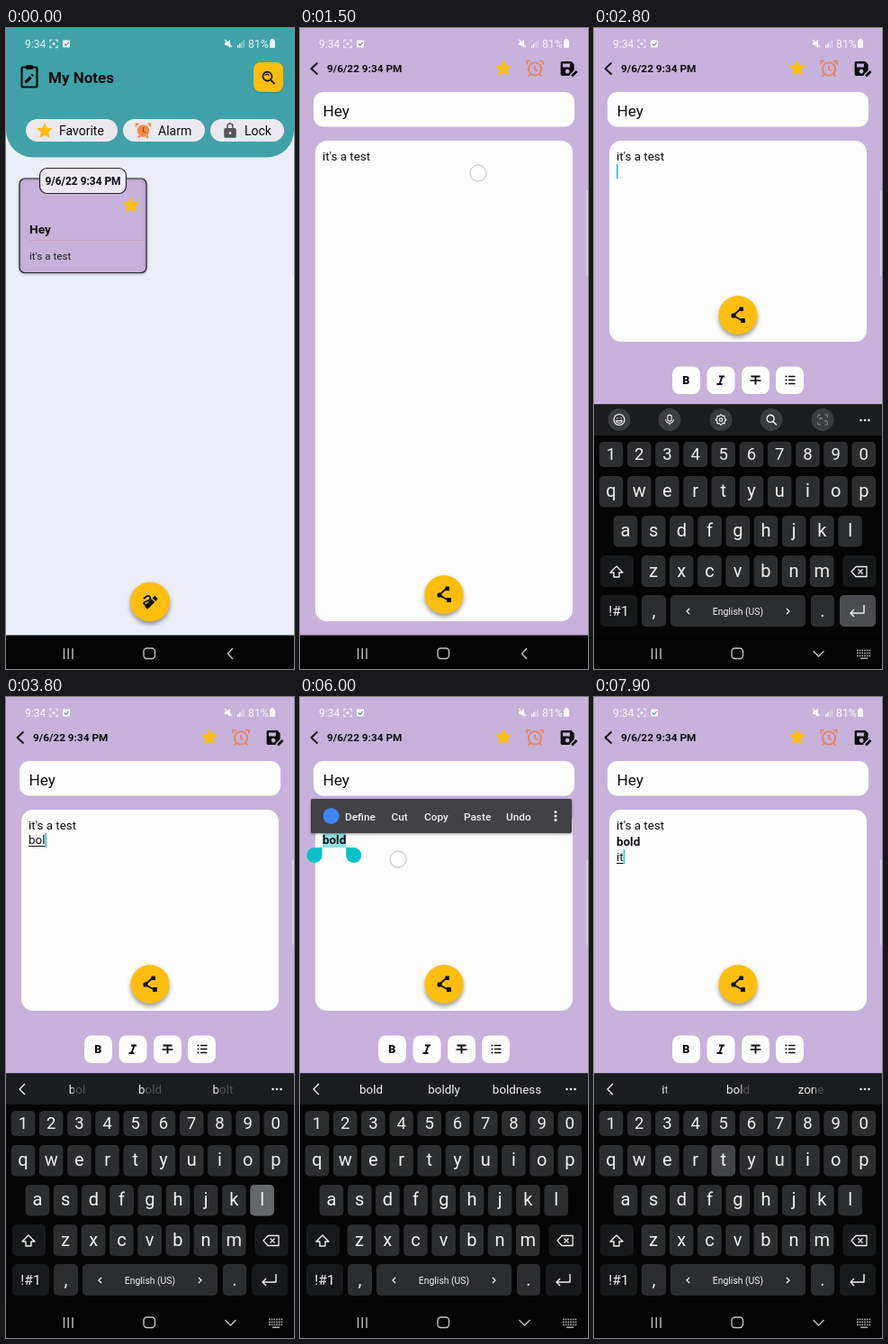
Animation of 320x711 px, one loop 8000 ms. Source, as an HTML page with a canvas:

```html
<!DOCTYPE html>
<html lang="en">
<head>
<meta charset="utf-8">
<title>Notes app</title>
<style>
  html, body { margin: 0; width: 100%; height: 100%; overflow: hidden; background: #000; }
  canvas { display: block; width: 320px; height: 711px; }
</style>
</head>
<body>
<canvas id="stage"></canvas>
<script>
const W = 320, H = 711, LOOP = 8000;
const TEAL = '#40a2a8', PURPLE = '#c6b2db', YELLOW = '#ffbe0b', INK = '#0d0d12',
      PAPER = '#fdfdfd', CYAN = '#06c1c7', LIGHT = '#f1f1f1';
const canvas = document.getElementById('stage');
const ratio = window.devicePixelRatio || 1;
canvas.width = W * ratio;
canvas.height = H * ratio;
const c = canvas.getContext('2d');

const clamp = v => Math.max(0, Math.min(1, v));
const mix = (a, b, p) => a + (b - a) * p;
const ramp = (t, start, length) => clamp((t - start) / length);
const easeInOut = s => s < .5 ? 4 * s ** 3 : 1 - (2 - 2 * s) ** 3 / 2;

function layer(draw, alpha = 1) {
  if (alpha <= 0) return;
  c.save();
  c.globalAlpha *= alpha;
  draw();
  c.restore();
}
function paint(path, fill, stroke, width = 1) {
  if (fill) { c.fillStyle = fill; c.fill(path, 'evenodd'); }
  if (stroke) { c.strokeStyle = stroke; c.lineWidth = width; c.stroke(path); }
}
function box(x, y, w, h, r, fill, stroke, width) {
  const p = new Path2D();
  p.roundRect(x, y, w, h, r);
  paint(p, fill, stroke, width);
}
function disc(x, y, r, fill, stroke, width) {
  const p = new Path2D();
  p.arc(x, y, r, 0, 7);
  paint(p, fill, stroke, width);
}
function font(size, weight = 400) { c.font = `${weight} ${size}px Roboto, sans-serif`; }
function text(s, x, y, size, color = INK, weight = 400, align = 'left') {
  font(size, weight);
  c.textAlign = align;
  c.fillStyle = color;
  c.fillText(s, x, y);
}
function line(d, color, width = 1.5) { paint(new Path2D(d), null, color, width); }

// Icons live on a 24-unit grid and are centred on (x, y).
function icon(d, x, y, size, fill, stroke, width) {
  layer(() => {
    c.translate(x, y);
    c.scale(size / 24, size / 24);
    c.translate(-12, -12);
    paint(new Path2D(d), fill, stroke, width);
  });
}
function shadowed(draw, blur = 5, dy = 3, color = 'rgba(0,0,0,.4)') {
  layer(() => {
    c.shadowColor = color;
    c.shadowBlur = blur * ratio;
    c.shadowOffsetY = dy * ratio;
    draw();
  });
}

const ICON = {
  star: 'M12 1l3.3 7.4 8 .8-6 5.4 1.7 8L12 18.5l-7 4.1 1.7-8-6-5.4 8-.8z',
  clock: 'M12 4a8.5 8.5 0 1 0 .01 0zM12 8v5l3.5 2M1.5 6.5V2H6M22.500 6.500V2H18M6 19l-3 3.500M18 19l3 3.500',
  clockBody: 'M12 4a8.500 8.500 0 1 0 .01 0zM1 8V2h6zM23 8V2h-6zM4 22l2-4 3 2-2 3zM20 22l-2-4-3 2 2 3z',
  lock: 'M19 8.500h-2V6A5 5 0 0 0 7 6v2.500H5a2 2 0 0 0-2 2V21a2 2 0 0 0 2 2h14a2 2 0 0 0 2-2V10.500a2 2 0 0 0-2-2zM9 8.500V6a3 3 0 0 1 6 0v2.500zM12 18a2 2 0 1 1 0-4 2 2 0 0 1 0 4z',
  save: 'M4 2h13l4 4v9l-7 7H4a2 2 0 0 1-2-2V4a2 2 0 0 1 2-2zM5 5v5h10V5zM11.500 13a3 3 0 1 0 .01 0z',
  search: 'M10.500 3a7 7 0 1 0 .01 0zM16 16l6 6',
  frame: 'M2 8V2h6M16 2h6v6M22 16v6h-6M8 22H2v-6',
  gear: 'M12 2l3 3h4v4l3 3-3 3v4h-4l-3 3-3-3H5v-4l-3-3 3-3V5h4zM12 9a3 3 0 1 0 .01 0z',
  mic: 'M12 2a4 4 0 0 1 4 4v5a4 4 0 0 1-8 0V6a4 4 0 0 1 4-4zM4 11a8 8 0 0 0 16 0M12 19v4',
  smile: 'M12 1a11 11 0 1 0 .01 0zM6 14a6 5 0 0 0 12 0zM8 8v2M16 8v2'
};

// ---- system bars ----
function statusBar() {
  const white = 'rgba(255,255,255,.88)';
  text('9:34', 21, 22, 12, white);
  icon(ICON.frame, 53, 17.5, 10, null, white, 2.5);
  disc(53, 17.5, 1.5, white);
  box(63, 13.5, 8, 8, 1, white);
  line('M65 17.500l1.700 1.800 3-3.500', '#7b86a4', 1.2);
  paint(new Path2D('M243 16h2l4-3v9l-4-3h-2z'), white);
  line('M243 13l8 8', white, 1.2);
  [3, 5, 7, 9].forEach((h, i) => box(257 + i * 2.2, 22 - h, 1.4, h, 0, i < 2 ? white : 'rgba(255,255,255,.4)'));
  text('81%', 269, 22, 12.3, white);
  box(293, 13.5, 6, 8.5, 1, white);
  box(294.5, 12, 3, 2, 0, white);
}
function navBar(keyboardOpen) {
  box(0, 673.5, W, 38, 0, '#030303');
  const gray = '#c4c4c4';
  [64.5, 69.2, 74].forEach(x => line(`M${x} 688v12`, gray, 1.4));
  box(153, 688, 12.5, 11.5, 3.5, null, gray, 1.4);
  line(keyboardOpen ? 'M243.500 691l6 6 6-6' : 'M252 688l-5.500 6 5.500 6', gray, 1.4);
  if (!keyboardOpen) return;
  for (let r = 0; r < 3; r++)
    for (let k = 0; k < 6; k++) box(292 + k * 2.7, 689.5 + r * 3, 1.7, 1.7, 0, '#aaa');
  box(296, 698.5, 8, 1.5, 0, '#aaa');
}

// ---- home screen ----
function chip(label, x, w, textX) {
  box(x, 101, w, 25, 12.5, '#ebe9ef');
  text(label, textX, 118.5, 14);
}
function home() {
  box(0, 0, W, 674, 0, '#ebeef7');
  box(0, 0, W, 143.5, [0, 0, 30, 30], TEAL);
  box(17.5, 43.5, 17, 22, 1.5, null, INK, 2.2);
  box(22, 41, 8, 5, 1.5, INK);
  line('M21.500 60.500l6-6', INK, 3.2);
  line('M28.500 53l1.500-1.500', INK, 3);
  text('My Notes', 47, 61, 17, INK, 700);
  shadowed(() => box(275, 38, 33, 33, 8, YELLOW), 2, 1, 'rgba(0,0,0,.2)');
  icon(ICON.search, 291.5, 55, 17, null, INK, 2.4);
  line('M287.500 52.500a3.200 3.200 0 0 1 5 0', INK, 1.2);
  chip('Favorite', 22, 102, 59);
  icon(ICON.star, 43, 113.5, 19, YELLOW);
  chip('Alarm', 130, 91, 169);
  icon(ICON.clockBody, 152.5, 113.5, 19, '#f28a4e');
  line('M152.500 110v5l3 1', '#9b3f2b', 1.2);
  chip('Lock', 227, 82, 265);
  icon(ICON.lock, 249, 113.5, 18, '#58545c');
  shadowed(() => disc(160, 636.5, 22, YELLOW));
  line('M155.500 643l8-8', INK, 5);
  line('M164.500 634l2.500-2.500', INK, 5);
  line('M153 633q5-5 7-2t-4 5 0 4', INK, 1.8);
}
function cardLabel() {
  box(37.5, 155.500, 96, 28, 8, '#ece9f2', '#25222b', 1.2);
  text('9/6/22 9:34 PM', 43.5, 174, 11.9, INK, 700);
}
function cardContent() {
  icon(ICON.star, 139, 196, 20, YELLOW);
  text('Hey', 26, 227.5, 13.7, INK, 700);
  box(26, 235, 126, 1, 0, '#c99fc2');
  text("it's a test", 26, 257, 11.7, '#222');
}

// ---- note editor ----
const LINE_X = 25;
function fab(y) {
  shadowed(() => disc(160, y, 21.5, YELLOW));
  line(`M163 ${y - 7}l-8.500 7.500 11 6`, INK, 1.8);
  box(161.5, y - 9, 4.5, 4.500, .5, INK);
  box(152.500, y - 2, 5, 5, 1.5, INK);
  box(163, y + 3.5, 5, 5, .5, INK);
}
function formatButtons(dy) {
  layer(() => {
    c.translate(0, dy);
    [87, 125.500, 164, 202].forEach(x => box(x, 375.500, 31, 30.500, 8, PAPER));
    text('B', 102.3, 395, 12.5, INK, 900, 'center');
    line('M139 386.500h6M136.500 395h6M142.500 386.500l-3 8.500', INK, 1.9);
    line('M174.500 386.500h10M179.500 386.500v9', INK, 1.9);
    line('M173.500 391h12', INK, 1.6);
    [386.5, 390.5, 394.5].forEach(y => line(`M212.500 ${y}h2M216 ${y}h7.500`, INK, 1.6));
  });
}
function page(bodyBottom) {
  box(0, 0, W, 674, 0, PURPLE);
  line('M19.500 38.500l-7 6.500 7 6.500', INK, 2);
  text('9/6/22 9:34 PM', 30, 49.3, 11.8, INK, 700);
  icon(ICON.star, 226, 44, 20, YELLOW);
  icon(ICON.clock, 261, 45, 20, null, '#e98561', 2.2);
  icon(ICON.save, 297.5, 45, 19, INK);
  line('M301.500 53.500l6-6', PURPLE, 5);
  line('M302 53.500l5.500-5.500', INK, 2.6);
  box(15, 71, 290, 38.5, 11, PAPER);
  text('Hey', 25.5, 97.5, 17.2);
  box(17, 125, 286, bodyBottom - 125, 13, PAPER);
  text("it's a test", LINE_X, 147, 13.4);
}

// ---- keyboard ----
const PRESSES = [['enter', 2700], ['b', 3200], ['o', 3500], ['l', 3750], ['d', 4000],
                 ['enter', 6950], ['i', 7500], ['t', 7750]];
const KEYS = [];
[['1234567890', 19, 459, 28], ['qwertyuiop', 19, 497, 34.5],
 ['asdfghjkl', 35, 541, 34.5], ['zxcvbnm', 66, 585, 35]].forEach(([row, x, y, h]) =>
  [...row].forEach((s, i) => KEYS.push({ s, x: x + i * 31.2 - 13.3, y, w: 26.6, h })));
KEYS.push({ s: ',', x: 53, y: 629, w: 27, h: 35 }, { s: '.', x: 241, y: 629, w: 26, h: 35 },
  { s: 'space', x: 85, y: 629, w: 150, h: 35 });
[['shift', 7, 585, 37], ['delete', 276.500, 585, 37], ['!#1', 7, 629, 41], ['enter', 273, 629, 40]]
  .forEach(([s, x, y, w]) => KEYS.push({ s, x, y, w, h: 35, dark: true }));

function key({ s, x, y, w, h, dark }, t) {
  box(x, y, w, h, 5, dark ? '#17181a' : '#2c2d2f');
  const glow = Math.max(0, ...PRESSES.map(([k, at]) => k === s && t >= at ? 1 - (t - at) / 220 : 0));
  layer(() => box(x, y, w, h, 5, '#77797d'), glow);
  if (s === 'space') {
    text('English (US)', 160, 650.5, 10.4, LIGHT, 400, 'center');
    line('M106 644l-3 3 3 3M214 644l3 3-3 3', LIGHT, 1.4);
  } else if (s === 'shift') line('M25 597l-7 7h4v5h6v-5h4z', LIGHT, 1.4);
  else if (s === 'delete') line('M291 597.500h12v11h-12l-5-5.500zM293.500 600.500l5 5M298.500 600.500l-5 5', LIGHT, 1.3);
  else if (s === 'enter') line('M300 640v9h-15M289 645l-4 4 4 4', LIGHT, 1.4);
  else {
    const small = s.length > 1, digit = y === 459;
    text(s, x + w / 2, y + h / 2 + (small ? 5 : 6), small ? 15.5 : digit ? 18.5 : 20, LIGHT, 400, 'center');
  }
}
function toolRow() {
  [28, 84, 141, 197, 254].forEach(x => disc(x, 434.5, 12.5, '#3b3c3f'));
  icon(ICON.smile, 28, 434.5, 13, null, LIGHT, 2);
  icon(ICON.mic, 84, 434.5, 13, null, LIGHT, 2);
  icon(ICON.gear, 141, 434.5, 14, null, LIGHT, 2);
  icon(ICON.search, 197, 434.5, 14, null, LIGHT, 2.4);
  icon(ICON.frame, 254, 434.5, 13, null, '#737477', 2.2);
  line('M250 433h4M256 436h3', '#737477', 2);
}
function suggestions(words, reveal) {
  line('M21 429l-6 6 6 6', LIGHT, 1.4);
  font(13.4);
  words.forEach((s, i) => {
    const x = 79 + 81 * i, half = c.measureText(s).width / 2 + 2;
    const fade = c.createLinearGradient(x - half, 0, x + half, 0);
    fade.addColorStop(reveal * .9, LIGHT);
    fade.addColorStop(Math.min(1, reveal * .9 + .15), reveal < 1 ? '#505153' : LIGHT);
    text(s, x, 440, 13.4, fade, 400, 'center');
  });
}
const WORDS = [[3200, 'b', 'be', 'but'], [3500, 'bo', 'both', 'box'], [3750, 'bol', 'bold', 'bolt'],
  [4000, 'bold', 'boldly', 'boldness'], [7500, 'i', 'in', 'is'], [7780, 'it', 'bold', 'zone']];
function keyboard(t, dy) {
  layer(() => {
    c.translate(0, dy);
    box(0, 417.5, W, 294, 0, '#050506');
    box(0, 417.5, W, 34.5, 0, '#1b1c1e');
    const now = WORDS.filter(w => t >= w[0]).pop();
    if (now) suggestions(now.slice(1), ramp(t, now[0], 190));
    else toolRow();
    [296.5, 301, 305.500].forEach(x => disc(x, 435, 1.3, LIGHT));
    KEYS.forEach(k => key(k, t));
  });
}

// ---- writing, selection and caret ----
const typed = (s, t) => [...s].filter((_, i) => t >= s.times[i]).join('');
function spell(word, times, t) { return word.slice(0, times.filter(x => t >= x).length); }

function writing(t) {
  const second = spell('bold', [3200, 3500, 3750, 4000], t);
  const third = spell('it', [7500, 7750], t);
  const newLine = t >= 6950, selected = t >= 4700 && t < 6250;
  const weight = t >= 5700 ? 700 : 400, base = newLine ? 165 : 163;
  font(13.4, weight);
  const width = c.measureText(second).width;
  if (selected) box(LINE_X, 151, width, 16, 0, '#8ee4e2');
  text(second, LINE_X, base, 13.4, INK, weight);
  if (second && t < 4700) box(LINE_X, 165, width, 1, 0, INK);
  text(third, LINE_X, 182, 13.4);
  const thirdWidth = c.measureText(third).width;
  if (third) box(LINE_X, 184, thirdWidth, 1, 0, INK);
  if (selected) {
    if (t >= 4950) {
      box(7.5, 167, 17, 17, [9, 0, 9, 9], CYAN);
      box(LINE_X + width, 167, 17, 17, [0, 9, 9, 9], CYAN);
    }
    return;
  }
  const lastEdit = Math.max(1600, ...[...PRESSES.map(p => p[1]), 6250].filter(x => x <= t));
  if (t < 1600 || (t - lastEdit) % 1000 >= 500) return;
  const [x, y] = newLine ? [thirdWidth, 169] : t >= 2700 ? [width, 151] : [54, 135];
  box(LINE_X + x, y, 1.6, 16, 0, '#21c9d0');
}
function popup(alpha) {
  layer(() => {
    shadowed(() => box(12, 113, 290, 38, 2, '#424246'), 3, 1);
    disc(34.5, 132, 9, '#4285f4');
    [['Define', 50], ['Cut', 101.5], ['Copy', 138], ['Paste', 182], ['Undo', 229]]
      .forEach(([s, x]) => text(s, x, 136.5, 11.8, LIGHT, 500));
    [127.500, 132, 136.5].forEach(y => disc(284, y, 1.6, LIGHT));
  }, alpha);
}

const TAPS = [[106, 232, 720, 870], [198, 161, 1400, 1570], [40, 160, 4480, 4560],
              [40, 160, 4640, 4730], [102, 390, 5580, 5720], [109, 180, 5900, 6080]];
function taps(t) {
  TAPS.forEach(([x, y, from, to]) => {
    if (t >= from) layer(() => disc(x, y, 9, 'rgba(255,255,255,.55)', 'rgba(150,140,175,.45)', 1.3), 1 - ramp(t, to, 80));
  });
}

// The card grows into the full note page.
function opening(t) {
  const p = easeInOut(ramp(t, 820, 400)), fade = clamp(p * 3);
  const x = mix(15, 0, p), y = mix(167, 26, p), w = mix(141, 320, p);
  const bottom = mix(271.5, 673.5, p ** 1.5), r = mix(6, 0, p);
  layer(() => {
    c.translate(0, 1);
    home();
  });
  cardLabel();
  box(0, 26, W, 648, 0, 'rgba(0,30,45,.045)');
  box(0, 0, W, 26, 0, PURPLE);
  box(.5, 26.5, W - 1, 647, 0, null, 'rgba(30,40,45,.75)');
  shadowed(() => box(x, y, w, bottom - y, r, PURPLE), 4, 4, 'rgba(0,0,0,.3)');
  layer(() => {
    const clip = new Path2D();
    clip.roundRect(x, y, w, bottom - y, r);
    c.clip(clip);
    layer(() => {
      c.translate(x, y);
      c.scale(w / 320, w / 320);
      c.translate(0, -26);
      page(658);
      fab(628.5);
    }, fade);
    layer(() => {
      c.translate(x, y);
      c.scale(w / 141, w / 141);
      c.translate(-15, -167);
      cardContent();
    }, 1 - fade);
  });
  if (p < .9) box(x, y, w, bottom - y, r, null, '#25222b', 1.2);
}

function draw(t) {
  c.setTransform(ratio, 0, 0, ratio, 0, 0);
  c.lineJoin = 'round';
  const lift = 1 - (1 - ramp(t, 1750, 350)) ** 3;
  if (t < 820) {
    home();
    shadowed(() => box(15, 167, 141, 104.5, 6, PURPLE, '#25222b', 1.2), 3, 1, 'rgba(0,0,0,.25)');
    cardLabel();
    cardContent();
  } else if (t < 1220) {
    opening(t);
  } else {
    page(mix(658, 348, lift));
    writing(t);
    fab(mix(628.5, 318.5, lift));
    if (lift > 0) {
      formatButtons(294 * (1 - lift));
      keyboard(t, 294 * (1 - lift));
    }
    popup(ramp(t, 5000, 120) * (1 - ramp(t, 6150, 100)));
  }
  taps(t);
  box(318, 180, 2, 95, 1, 'rgba(225,225,235,.65)');
  statusBar();
  navBar(lift > 0);
}

const start = performance.now();
function tick() {
  draw((performance.now() - start) % LOOP);
  requestAnimationFrame(tick);
}
tick();
</script>
</body>
</html>
```
